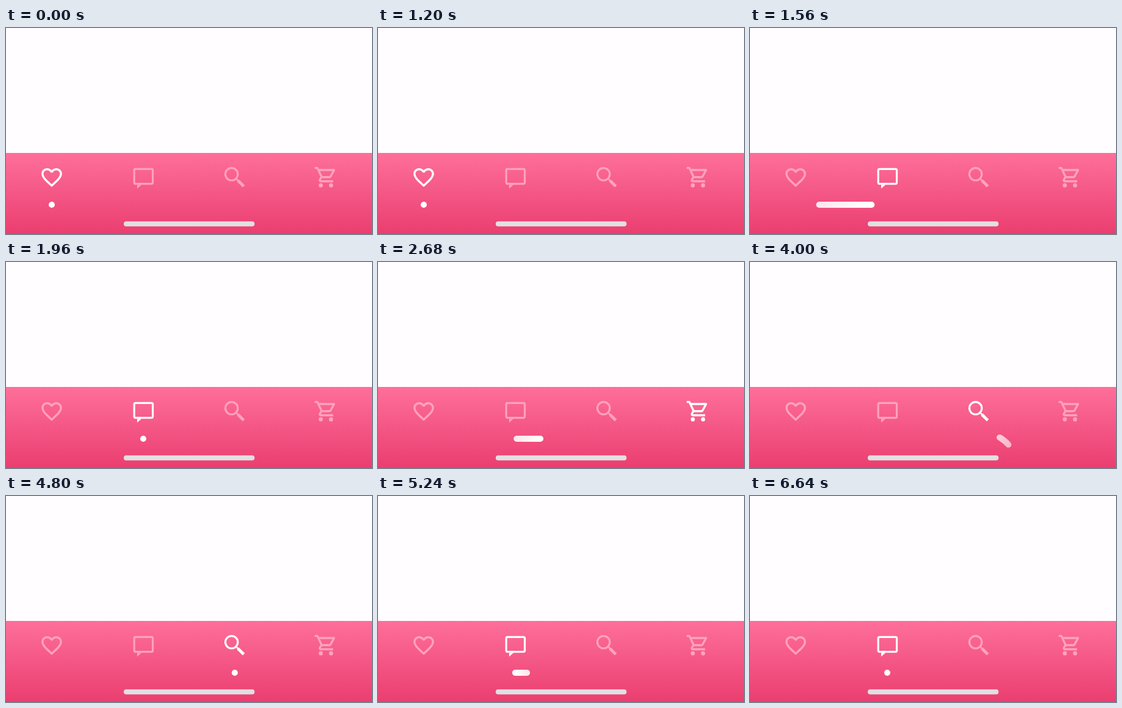
An HTML page with a canvas that plays this animation: 600 px wide and 338 px high, repeating every 6680 ms.

```html
<!DOCTYPE html>
<html lang="en">
<head>
<meta charset="utf-8">
<title>Tab bar</title>
<style>
  html, body { margin: 0; width: 100%; height: 100%; overflow: hidden; background: #fffdff; }
  canvas { display: block; width: 600px; height: 338px; }
</style>
</head>
<body>
<canvas id="stage"></canvas>
<script>
const LOOP = 6680, STEP = 40, FLIGHT = 400;
const DOT_Y = 290;
const tabX = i => 75 + 150 * i;

// Each hop: start time, tabs, trail lag in ms, trail opacity, bouncing or flat
const hops = [
  { at: 1300, from: 0, to: 1, lag: 100, alpha: 1 },
  { at: 2550, from: 1, to: 3, lag: 80, alpha: 1 },
  { at: 3754, from: 3, to: 2, lag: 19, alpha: 0.7, bounce: true },
  { at: 4840, from: 2, to: 1, lag: 127, alpha: 1 }
];

const canvas = document.getElementById('stage');
const ctx = canvas.getContext('2d');
const ratio = window.devicePixelRatio || 1;
canvas.width = 600 * ratio;
canvas.height = 338 * ratio;

const heart = new Path2D('M16.5 3c-1.74 0-3.41.81-4.5 2.09C10.91 3.81 9.24 3 7.5 3 4.42 3 2 5.42 2 8.5c0 3.78 3.4 6.86 8.55 11.54L12 21.35l1.45-1.32C18.6 15.36 22 12.28 22 8.5 22 5.42 19.58 3 16.5 3zm-4.4 15.55l-.1.1-.1-.1C7.14 14.24 4 11.39 4 8.5 4 6.5 5.5 5 7.5 5c1.54 0 3.04.99 3.57 2.36h1.87C13.46 5.99 14.96 5 16.5 5c2 0 3.5 1.5 3.5 3.5 0 2.89-3.14 5.74-7.9 10.05z');
const cart = new Path2D('M15.55 13c.75 0 1.41-.41 1.75-1.03l3.58-6.49A.996.996 0 0 0 20.01 4H5.21l-.94-2H1v2h2l3.6 7.59-1.35 2.44C4.52 15.37 5.48 17 7 17h12v-2H7l1.1-2h7.45zM6.16 6h12.15l-2.76 5H8.53L6.16 6zM7 18a2 2 0 1 0 0 4 2 2 0 0 0 0-4zM17 18a2 2 0 1 0 0 4 2 2 0 0 0 0-4z');

function fillAt(path, x, y) {
  ctx.save();
  ctx.translate(x, y);
  ctx.scale(1.68, 1.68);
  ctx.fill(path, 'evenodd');
  ctx.restore();
}

function line(x1, y1, x2, y2, width) {
  ctx.lineWidth = width;
  ctx.beginPath();
  ctx.moveTo(x1, y1);
  ctx.lineTo(x2, y2);
  ctx.stroke();
}

function roundBox(x, y, w, h, r) {
  ctx.beginPath();
  ctx.roundRect(x, y, w, h, r);
}

const icons = [
  () => fillAt(heart, 54.8, 225),
  () => {
    ctx.lineWidth = 3.2;
    roundBox(210.2, 231.4, 30.4, 24.2, 2);
    ctx.stroke();
    ctx.beginPath();
    ctx.moveTo(215, 257.2);
    ctx.lineTo(222.2, 257.2);
    ctx.lineTo(215, 263.4);
    ctx.fill();
  },
  () => {
    ctx.lineWidth = 3.2;
    ctx.beginPath();
    ctx.arc(369.8, 239.8, 10.2, 0, Math.PI * 2);
    ctx.stroke();
    line(378.2, 248.2, 381, 251, 2.6);
    line(380.2, 250.2, 389.8, 259.8, 4.8);
  },
  () => fillAt(cart, 504.3, 224.6)
];

const clamp = v => Math.min(1, Math.max(0, v));
const ease = p => p < 0.5 ? 4 * p ** 3 : 1 - 4 * (1 - p) ** 3;

function pointOn(hop, u) {
  const x = tabX(hop.from) + (tabX(hop.to) - tabX(hop.from)) * u;
  if (!hop.bounce) return [x, DOT_Y];
  if (u < 0.6) return [x, DOT_Y + 24 * (u / 0.6) ** 2];
  const v = (u - 0.6) / 0.4;
  return [x, DOT_Y + (1 - v) * (24 - 64 * v)];
}

function drawDot(x) {
  ctx.fillStyle = '#fff';
  ctx.beginPath();
  ctx.arc(x, DOT_Y, 5, 0, Math.PI * 2);
  ctx.fill();
}

function drawTrail(hop, t) {
  const head = ease(clamp((t - hop.at) / FLIGHT));
  const tail = ease(clamp((t - hop.at - hop.lag) / FLIGHT));
  if (head - tail < 0.004) return drawDot(pointOn(hop, head)[0]);
  const a = pointOn(hop, tail), b = pointOn(hop, head);
  const tint = ctx.createLinearGradient(...b, ...a);
  tint.addColorStop(0, '#fff');
  tint.addColorStop(1, '#ffe6ee');
  ctx.save();
  ctx.globalAlpha = hop.alpha;
  ctx.strokeStyle = tint;
  ctx.lineWidth = 10;
  ctx.lineCap = ctx.lineJoin = 'round';
  ctx.beginPath();
  for (let i = 0; i <= 16; i++) ctx.lineTo(...pointOn(hop, tail + (head - tail) * i / 16));
  ctx.stroke();
  ctx.restore();
}

function draw(t) {
  ctx.setTransform(ratio, 0, 0, ratio, 0, 0);
  ctx.fillStyle = '#fffdff';
  ctx.fillRect(0, 0, 600, 338);

  const pink = ctx.createLinearGradient(0, 205, 0, 338);
  pink.addColorStop(0, '#fe6f9a');
  pink.addColorStop(1, '#ea3e70');
  ctx.fillStyle = pink;
  ctx.fillRect(0, 205, 600, 133);

  const hop = hops.filter(h => h.at <= t).pop();
  const active = hop ? hop.to : 0;
  icons.forEach((icon, i) => {
    ctx.fillStyle = ctx.strokeStyle = i === active ? '#fff' : '#ffa2bc';
    icon();
  });

  ctx.fillStyle = '#e2dfe1';
  roundBox(193, 317.3, 214.5, 8.2, 4.1);
  ctx.fill();

  if (hop && t < hop.at + FLIGHT + hop.lag) drawTrail(hop, t);
  else drawDot(tabX(active));
}

const start = performance.now();
function tick() {
  const t = (performance.now() - start) % LOOP;
  draw(Math.floor(t / STEP + 0.01) * STEP);
  requestAnimationFrame(tick);
}
tick();
</script>
</body>
</html>
```
